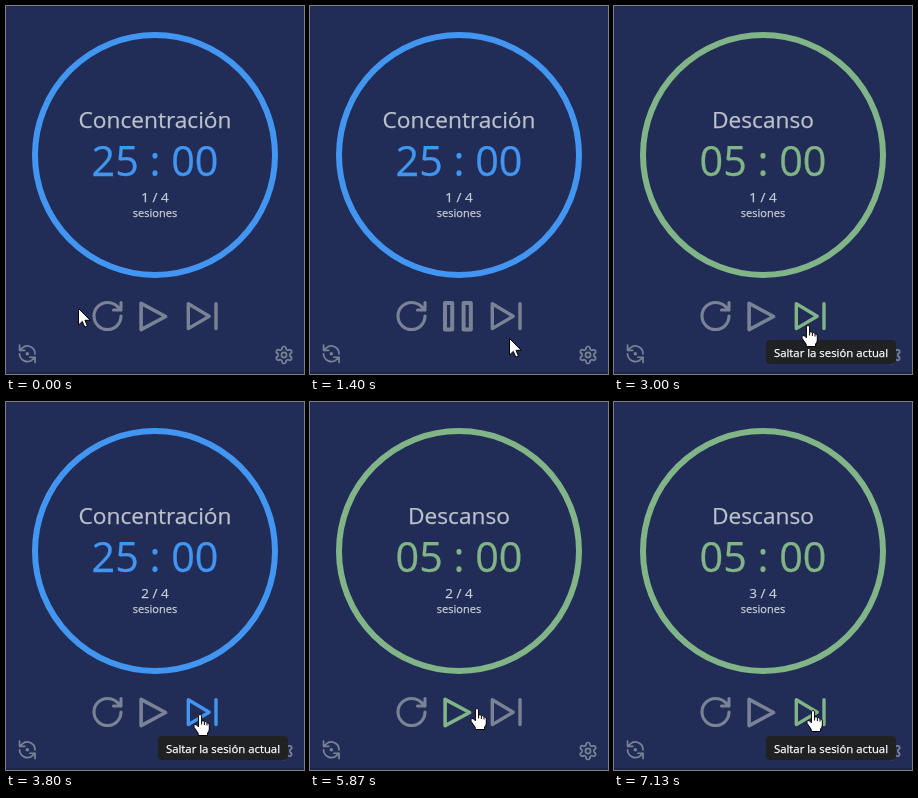
Write an HTML page that moves like this. It is 298 px wide and 368 px high and loops after 8000 ms.

```html
<!DOCTYPE html>
<html lang="es">
<head>
<meta charset="utf-8">
<title>Temporizador</title>
<style>
  html, body { margin: 0; height: 100%; overflow: hidden; background: #212d56; }
  svg { display: block; width: 100vw; height: 100vh; }
  text {
    font-family: "Open Sans", "Noto Sans", sans-serif; text-anchor: middle;
    color: #c9cdd6; fill: currentColor; stroke: currentColor; stroke-width: .25;
  }
  .icon { fill: none; stroke: #7a8296; stroke-linecap: round; stroke-linejoin: round; }
  .pointer { fill: #fff; stroke: #000; stroke-linejoin: round; }
</style>
</head>
<body>
<svg viewBox="0 0 298 368">
  <rect width="298" height="368" fill="#212d56"/>
  <rect y="366" width="298" height="2" fill="#1b2548"/>

  <circle id="ring" cx="149" cy="149" r="120" fill="none" stroke-width="6" stroke-linecap="round"
    transform="rotate(-90 149 149)"/>
  <text id="title" x="149" y="122" font-size="22.7" style="color:#bcc1cb"></text>
  <text id="clock" x="149" y="170" font-size="41.3"></text>
  <text id="count" x="149" y="196" font-size="13.5"></text>
  <text x="149" y="211" font-size="11">sesiones</text>

  <g class="icon" stroke-width="3.6">
    <path stroke-width="3.1" transform="translate(101.5 310)"
      d="M13.5 0A13.5 13.5 0 1 1 0 -13.5C3.8 -13.5 7.4 -12 10.1 -9.4L13.5 -6M13.5 -13.5V-6H6"/>
    <path id="play" d="M135.1 297.3V323.7L159.6 310.5Z"/>
    <g id="pause" stroke-width="4">
      <rect x="135" y="297" width="7.2" height="26.4"/>
      <rect x="153.6" y="297" width="7.2" height="26.4"/>
    </g>
    <path id="skip" stroke-width="3.4" d="M182.3 297.8V322.6L203.2 310.2ZM210 297.8V322.6"/>
  </g>

  <g class="icon" stroke-width="2">
    <g transform="translate(21.3 347.8) scale(.86)">
      <path id="arc" d="M-9 -10V-4H-3M9 0A9 9 0 0 0 -6 -6.7L-9 -4"/>
      <use href="#arc" transform="rotate(180)"/>
      <circle r="1"/>
    </g>
    <g id="gear" transform="translate(278 349) scale(.85)"><circle r="3"/></g>
  </g>

  <g id="tip">
    <rect x="152" y="334" width="130" height="24" rx="4" fill="#202123"/>
    <text x="217" y="351" font-size="11.35" style="color:#fff">Saltar la sesión actual</text>
  </g>

  <path id="arrow" class="pointer" d="M.5 .5V17L4.3 13.4 6.8 19.2 9.4 18 7 12.3H12.2Z"/>
  <g id="hand" class="pointer">
    <path d="M-1.6 .6Q0 -1.8 1.6 .6V6Q3.4 5.2 4.4 6.8Q6 6 7 7.8Q9.3 7.4 9.3 10V14Q9.3 16.5 7.6 18V20.5H-1.8V18.3L-5.8 12.5Q-6.8 10 -5 9.5Q-3.5 9.2 -1.6 11.8Z"/>
    <path fill="none" d="M1.6 6V9.5M4.4 6.8V10M7 7.8V10.5"/>
  </g>
</svg>
<script>
const LOOP = 8000, START = 670, TIP_DELAY = 150;
const SKIPS = [3000, 3800, 4470, 6530, 7130];
const MODES = [
  { title: 'Concentración', color: '#4296f2', seconds: 1500 },
  { title: 'Descanso', color: '#81b588', seconds: 300 }
];

// Each move eases to a point along a curve bent by the given offset.
const HOME = [72, 302];
const MOVES = [
  { from: 90, to: 530, end: [157, 317], bend: [0, 19] },
  { from: 760, to: 1400, end: [199, 332], bend: [0, 14] },
  { from: 1400, to: 1750, end: [194, 320], bend: [0, 0] },
  { from: 3300, to: 3600, end: [194, 313], bend: [-16, -5] },
  { from: 5100, to: 5700, end: [158, 309], bend: [0, -6] },
  { from: 5730, to: 6200, end: [199, 309], bend: [0, -3] }
];

const IDLE = '#7a8296';
const LENGTH = 240 * Math.PI;
const $ = id => document.getElementById(id);
const show = (id, on) => $(id).setAttribute('visibility', on ? 'visible' : 'hidden');
const pad = n => String(n).padStart(2, '0');
const ease = k => k * k * (3 - 2 * k);

function buildGear() {
  const tooth = 'M-2.2 -7.8V-8A2 2 0 0 1 -.2 -10H.2A2 2 0 0 1 2.2 -8V-7.8' +
    'A2 2 0 0 0 3.2 -6.1L3.65 -5.84A2 2 0 0 0 5.65 -5.84';
  for (let i = 0; i < 6; i++) {
    const path = document.createElementNS('http://www.w3.org/2000/svg', 'path');
    path.setAttribute('d', tooth);
    path.setAttribute('transform', `rotate(${i * 60})`);
    $('gear').append(path);
  }
}

function pointerAt(t) {
  let pos = HOME;
  for (const { from, to, end, bend } of MOVES) {
    if (t < from) break;
    const k = ease(Math.min(1, (t - from) / (to - from)));
    pos = pos.map((p, i) => p + (end[i] - p) * k + bend[i] * 4 * k * (1 - k));
  }
  return pos.map(Math.round);
}

function buttonAt([x, y]) {
  if (y < 290 || y > 327) return '';
  if (x > 126 && x < 172) return 'play';
  return x >= 172 && x < 220 ? 'skip' : '';
}

function draw(t) {
  const skips = SKIPS.filter(s => s <= t).length;
  const mode = MODES[skips % 2];
  const running = t >= START && !skips;
  const elapsed = running ? (t - START) / 1000 : 0;
  const left = mode.seconds - Math.floor(elapsed);

  $('title').textContent = mode.title;
  $('clock').textContent = `${pad(Math.floor(left / 60))} : ${pad(left % 60)}`;
  $('clock').style.color = mode.color;
  $('count').textContent = `${1 + Math.floor(skips / 2)} / 4`;
  $('ring').style.stroke = mode.color;
  $('ring').style.strokeDasharray = running
    ? `${LENGTH * (1 - elapsed / mode.seconds)} ${LENGTH}` : 'none';

  const pos = pointerAt(t);
  const over = buttonAt(pos);
  for (const id of ['play', 'pause', 'skip']) {
    const hovered = over === (id === 'pause' ? 'play' : id);
    $(id).style.stroke = hovered ? mode.color : IDLE;
  }
  show('play', !running);
  show('pause', running);
  show('tip', over === 'skip' && buttonAt(pointerAt(t - TIP_DELAY)) === 'skip');
  show('arrow', !over);
  show('hand', over);
  $(over ? 'hand' : 'arrow').setAttribute('transform', `translate(${pos})`);
}

function tick() {
  draw(performance.now() % LOOP);
  requestAnimationFrame(tick);
}

buildGear();
tick();
</script>
</body>
</html>
```
